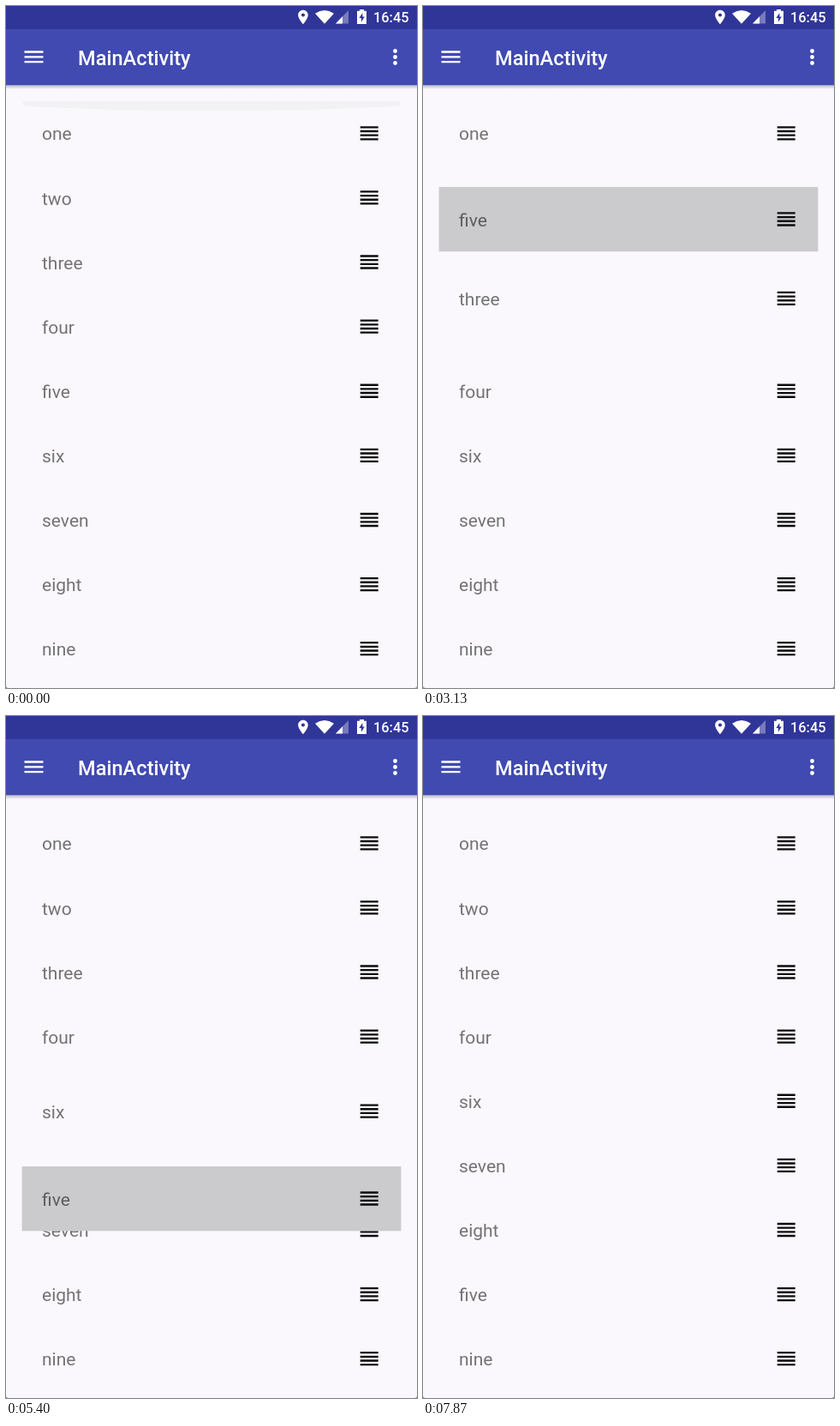
Recreate the animation shown at these times as an HTML page. Size 480 px wide and 795 px high, loop 8 s.

```html
<!DOCTYPE html>
<html lang="en">
<head>
<meta charset="utf-8">
<title>Drag to reorder</title>
<style>
  html, body { margin: 0; width: 100%; height: 100%; overflow: hidden; background: #8b8a8e; }
  svg { display: block; width: 480px; height: 795px; font-family: Roboto, sans-serif; }
  .row text { font-size: 21px; fill: rgba(0, 0, 0, .54); }
  .row path { stroke: #0c0c0c; stroke-width: 2.35; }
  .row rect { fill: #cbcacc; visibility: hidden; }
  .held rect { visibility: visible; }
  .bar { fill: #fff; font-weight: 500; }
</style>
</head>
<body>
<svg viewBox="0 0 480 795">
  <defs>
    <linearGradient id="shade" x2="0" y2="1">
      <stop offset="0" stop-color="#55587f" stop-opacity=".42"/>
      <stop offset="1" stop-color="#55587f" stop-opacity="0"/>
    </linearGradient>
  </defs>
  <path d="M0 0H480V792Q480 795 477 795H3Q0 795 0 792Z" fill="#faf8fc"/>
  <g id="list"></g>
  <path id="glow" d="M20 0H461V6Q240 17 20 6Z" fill="#f2f2f4"/>

  <rect y="92" width="480" height="5" fill="url(#shade)"/>
  <rect width="480" height="92.2" fill="#404ab1"/>
  <rect width="480" height="26.9" fill="#303598"/>
  <g class="bar">
    <path d="M12 2C8.1 2 5 5.1 5 9c0 5.3 7 13 7 13s7-7.7 7-13c0-3.9-3.1-7-7-7zm0 9.5a2.5 2.5 0 1 1 0-5 2.5 2.5 0 0 1 0 5z"
          transform="translate(337 3) scale(.83)"/>
    <path d="M361 8.7Q372 1.3 383 8.7L372 20.8Z"/>
    <path d="M385 20.5L400 5V20.5Z" opacity=".35"/>
    <path d="M385 20.5L393 12.3V20.5Z"/>
    <path d="M413 4H418V5.7H421V21H410V5.7H413Z"/>
    <path d="M416.4 8L412.4 14H414.9V18.8L418.8 12.6H416.4Z" fill="#303598"/>
    <text x="429" y="19.3" font-size="16.35">16:45</text>
    <path d="M21.5 53.5H43.5m-22 5.85H43.5m-22 5.85H43.5" stroke="#fff" stroke-width="2.3"/>
    <text x="84" y="68.7" font-size="23.6">MainActivity</text>
    <circle cx="454.5" cy="52.5" r="2.4"/>
    <circle cx="454.5" cy="59.5" r="2.4"/>
    <circle cx="454.5" cy="66.5" r="2.4"/>
  </g>
</svg>
<script>
const LOOP = 8000, FRAMES = 120, STEP = LOOP / FRAMES;
const TOP = 110.8, ROW = 75.11, GAP = 7, SWAP = 250;
const GRAB = 660, DROP = 7567, CLEAR = 7860;
const names = ['one', 'two', 'three', 'four', 'five', 'six', 'seven', 'eight', 'nine'];
const HELD = 4;

// finger path: time, top edge of the held row
const path = [
  [1350, 411.2], [2075, 329], [2333, 319], [2998, 254], [3133, 211],
  [3570, 167], [4001, 268], [5000, 467], [5216, 493.5], [5400, 525],
  [5870, 565], [6333, 601], [6933, 643.2], [7150, 644]
];

const clamp = x => Math.min(1, Math.max(0, x));
const ease = x => (1 - Math.cos(Math.PI * clamp(x))) / 2;
const slotTop = i => TOP + ROW * i;

function slope(i) {
  const p = path[i - 1], q = path[i], r = path[i + 1];
  if (!p || !r) return 0;
  const a = (q[1] - p[1]) / (q[0] - p[0]), b = (r[1] - q[1]) / (r[0] - q[0]);
  return a * b > 0 ? 2 * a * b / (a + b) : 0;
}

// monotone cubic through the finger path
function fingerTop(t) {
  const last = path.length - 1;
  if (t <= path[0][0]) return path[0][1];
  if (t >= path[last][0]) return path[last][1];
  const i = path.findIndex(p => p[0] > t);
  const [t0, y0] = path[i - 1], [t1, y1] = path[i];
  const d = t1 - t0, u = (t - t0) / d, v = 1 - u;
  return y0 * v * v * (1 + 2 * u) + y1 * u * u * (1 + 2 * v)
    + d * u * v * (v * slope(i - 1) - u * slope(i));
}

// a neighbour moves over once the held row is GAP past its edge
function findSwaps() {
  const order = names.map((_, i) => i), swaps = [];
  let slot = HELD;
  for (let t = 0; t < DROP; t++) {
    const y = fingerTop(t);
    const by = y < slotTop(slot - 1) - GAP ? -1 : y > slotTop(slot + 1) + GAP ? 1 : 0;
    if (!by) continue;
    const item = order[slot + by];
    swaps.push({ item, t, by: -by });
    order[slot] = item;
    slot += by;
    order[slot] = HELD;
  }
  return { swaps, slot };
}
const { swaps, slot: endSlot } = findSwaps();

function rowTop(item, t) {
  if (item === HELD) {
    const y = fingerTop(t);
    return y + (slotTop(endSlot) - y) * ease((t - DROP) / SWAP);
  }
  return swaps.filter(s => s.item === item)
    .reduce((y, s) => y + s.by * ROW * ease((t - s.t) / SWAP), slotTop(item));
}

const list = document.getElementById('list');
const glow = document.getElementById('glow');
list.innerHTML = names.map(n => `<g class="row">
  <rect x="18.6" width="442.8" height="75.3"/>
  <text x="42" y="45.7">${n}</text>
  <path d="M413.7 30.5h21m-21 4.67h21m-21 4.67h21m-21 4.67h21"/></g>`).join('');
const rows = [...list.children];
list.append(rows[HELD]);

function draw(t) {
  rows.forEach((row, i) => row.setAttribute('transform', `translate(0 ${rowTop(i, t)})`));
  rows[HELD].classList.toggle('held', t >= GRAB && t < CLEAR);
  const fade = 1 - clamp(t / 470);
  glow.setAttribute('transform', `translate(0 ${TOP}) scale(1 ${fade})`);
  glow.setAttribute('opacity', fade);
}

const begin = performance.now();
function tick() {
  const t = performance.now() - begin;
  draw(Math.floor((t + 4) / STEP) % FRAMES * STEP);
  requestAnimationFrame(tick);
}
tick();
</script>
</body>
</html>
```
